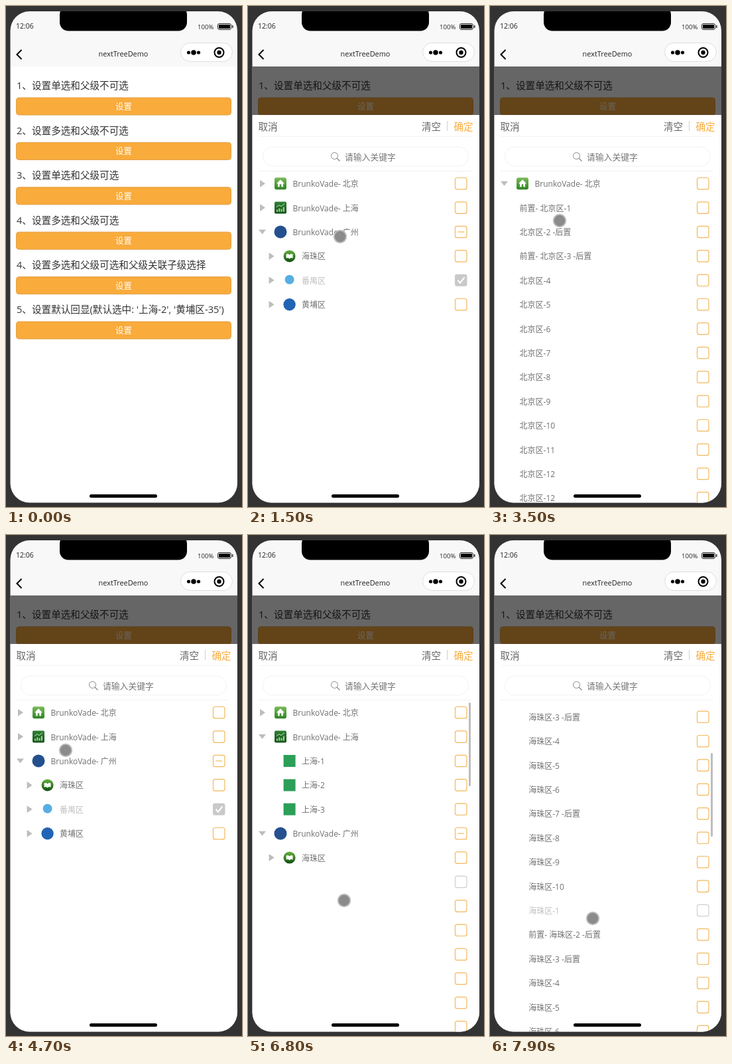
Recreate the animation shown at these times as an HTML page with a canvas. Size 356 by 754 pixels, loop 8000 ms.

```html
<!DOCTYPE html>
<html lang="zh-CN">
<head>
<meta charset="utf-8">
<title>nextTreeDemo</title>
<style>
html, body { margin: 0; width: 356px; height: 754px; overflow: hidden; background: #333; }
canvas { display: block; width: 356px; height: 754px; }
</style>
</head>
<body>
<canvas id="stage"></canvas>
<script>
const canvas = document.getElementById('stage');
const ctx = canvas.getContext('2d');
const dpr = window.devicePixelRatio || 1;
canvas.width = 356 * dpr;
canvas.height = 754 * dpr;
ctx.scale(dpr, dpr);

const LOOP = 8000, STEP = 100;
const ORANGE = '#f9ab3b', ROW = 36.4, PANEL_TOP = 164, SCROLL_END = 321;
const BRAND = 'BrunkoVade- ';
const BEIJING = { open: 2700, ready: 2800, close: 4500 };
const SHANGHAI = { open: 5400, ready: 5500, close: LOOP };
const HAIZHU = { open: 6600, ready: 6900, close: LOOP };
const ICONS_LOADED = 1300;

// Pointer: time, x, y
const POINTER = [
  [100, 344, 137], [200, 275, 290], [300, 195, 396], [400, 190, 360],
  [1300, 190, 360], [1700, 88, 334], [1800, 88, 334], [2100, 19, 279],
  [2300, 21, 272], [2500, 43, 282], [3100, 62, 302], [3500, 105, 323],
  [4000, 106, 338], [4100, 106, 338], [4400, 26, 274], [4700, 90, 324],
  [4900, 90, 324], [5300, 26, 304], [5500, 30, 308], [5800, 60, 400],
  [6200, 37, 486], [6500, 37, 486], [6800, 145, 550], [7900, 155, 577]
];

const clamp = v => Math.max(0, Math.min(1, v));
const smooth = u => u * u * (3 - 2 * u);

function text(str, x, y, size, color, align = 'left') {
  ctx.font = `${size}px "Open Sans", "Noto Sans CJK SC", "Noto Sans CJK", sans-serif`;
  ctx.textAlign = align;
  ctx.fillStyle = color;
  ctx.fillText(str, x, y + size * 0.37);
}

function box(x, y, w, h, r, fill, stroke, width = 1) {
  ctx.beginPath();
  ctx.roundRect(x, y, w, h, r);
  paint(fill, stroke, width);
}

function disc(x, y, r, fill, stroke, width = 1) {
  ctx.beginPath();
  ctx.arc(x, y, r, 0, 7);
  paint(fill, stroke, width);
}

function poly(points, fill, stroke, width = 1) {
  ctx.beginPath();
  points.forEach(([x, y]) => ctx.lineTo(x, y));
  paint(fill, stroke, width);
}

function paint(fill, stroke, width) {
  if (fill) { ctx.fillStyle = fill; ctx.fill(); }
  if (stroke) { ctx.strokeStyle = stroke; ctx.lineWidth = width; ctx.stroke(); }
}

function rect(x, y, w, h, fill) {
  ctx.fillStyle = fill;
  ctx.fillRect(x, y, w, h);
}

function glossy(top, bottom) {
  const g = ctx.createLinearGradient(0, -9, 0, 9);
  g.addColorStop(0, top);
  g.addColorStop(1, bottom);
  return g;
}

const ICONS = {
  house() {
    box(-9, -9, 18, 18, 3, glossy('#7cba58', '#2f8426'));
    poly([[-6, 0], [0, -6], [6, 0], [4, 0], [4, 5], [1.3, 5], [1.3, 1], [-1.3, 1], [-1.3, 5], [-4, 5], [-4, 0]], '#fff');
  },
  chart() {
    box(-9, -9, 18, 18, 2, glossy('#2f8035', '#12541b'));
    [3, 5, 4, 7].forEach((h, i) => rect(-6 + i * 3.3, 6 - h, 2, h, '#a9d48c'));
    poly([[-6, -1], [-2, -4], [1, -2], [6, -6]], null, '#c9e8b3');
  },
  book() {
    disc(0, 0, 9, glossy('#67b13e', '#0d4f10'));
    poly([[-5, -3], [-2, -3.5], [0, -2], [2, -3.5], [5, -3], [5, 3], [2, 2.5], [0, 4], [-2, 2.5], [-5, 3]], '#fff');
  },
  navy() { disc(0, 0, 9.5, '#25508f'); },
  sky() { disc(0, -1, 7, '#56aee2'); },
  blue() { disc(0, 0, 9.2, '#2264b4'); },
  green() { box(-9, -9, 18, 18, 0, '#2b9f58'); }
};

function treeRows(t) {
  const rows = [];
  const isOpen = n => t >= n.open && t < n.close;
  const isReady = n => t >= n.ready && t < n.close;
  const add = (label, depth, more) => rows.push({ label, depth, ...more });

  add(BRAND + '北京', 0, { icon: 'house', arrow: true, down: isReady(BEIJING) });
  if (isOpen(BEIJING)) {
    for (let i = 1; i <= 14; i++) {
      const pre = i === 1 || i === 3 ? '前置- ' : '';
      const post = i === 2 || i === 3 ? ' -后置' : '';
      add(`${pre}北京区-${Math.min(i, 12)}${post}`, 1, { blank: !isReady(BEIJING) });
    }
  }
  add(BRAND + '上海', 0, { icon: 'chart', arrow: true, down: isOpen(SHANGHAI) });
  if (isOpen(SHANGHAI)) {
    for (let i = 1; i <= 3; i++) add('上海-' + i, 1, { icon: 'green', blank: !isReady(SHANGHAI) });
  }
  add(BRAND + '广州', 0, { icon: 'navy', arrow: true, down: true, partial: true });
  add('海珠区', 1, { icon: 'book', arrow: true, down: isReady(HAIZHU) });
  if (isOpen(HAIZHU)) {
    for (let i = 0; i < 40; i++) {
      const n = i % 10 + 1;
      const post = [2, 3, 7].includes(n) ? ' -后置' : '';
      add(`${n === 2 ? '前置- ' : ''}海珠区-${n}${post}`, 2, { disabled: n === 1, blank: !isReady(HAIZHU) });
    }
  }
  const late = t < ICONS_LOADED;
  add('番禺区', 1, { icon: 'sky', arrow: true, disabled: true, checked: true, late });
  add('黄埔区', 1, { icon: 'blue', arrow: true, late });
  return rows;
}

function drawRow(row, y) {
  const left = 13.6 * row.depth;
  if (!row.blank) {
    if (row.arrow) {
      const x = left + 21.5;
      poly(row.down ? [[x - 5.5, y - 3.5], [x + 5.5, y - 3.5], [x, y + 3.5]]
                    : [[x - 3.5, y - 5.5], [x + 4.5, y], [x - 3.5, y + 5.5]], '#bdbdbd');
    }
    if (row.icon && !row.late) {
      ctx.save();
      ctx.translate(left + 49, y);
      ICONS[row.icon]();
      ctx.restore();
    }
    text(row.label, left + (row.icon ? 67.5 : 31), y + 0.5, 12, row.disabled ? '#bfbfbf' : '#707070');
  }
  if (row.checked) {
    box(312, y - 9, 18.5, 18, 3, '#c9c9c9');
    poly([[316.5, y], [320, y + 4], [326.5, y - 4.5]], null, '#fff', 2.2);
  } else {
    box(312.5, y - 8.7, 17.5, 17.4, 3, '#fff', row.disabled ? '#cfcfcf' : '#f5b85c', 1.2);
    if (row.partial) rect(316.5, y - 0.6, 9.5, 1.2, '#f5b85c');
  }
}

function drawPage(t) {
  const titles = [
    '1、设置单选和父级不可选', '2、设置多选和父级不可选', '3、设置单选和父级可选',
    '4、设置多选和父级可选', '4、设置多选和父级可选和父级关联子级选择',
    "5、设置默认回显(默认选中: '上海-2', '黄埔区-35')"
  ];
  rect(6, 91, 344, 657, '#fff');
  titles.forEach((title, i) => {
    const y = 120 + i * 67.4;
    const pressed = i === 3 && t === 300;
    text(title, 16, y, 14.6, '#333');
    box(15.5, y + 18, 324, 26, 4, pressed ? '#e09a35' : ORANGE, '#e2a044');
    text('设置', 177.5, y + 31.5, 12.4, '#fff', 'center');
  });
}

function drawPanel(t, top) {
  rect(6, top, 344, 600, '#fff');
  text('取消', 15.5, top + 17.5, 14.6, '#666');
  text('清空', 262, top + 17.5, 14.6, '#666');
  rect(300, top + 9, 1, 15, '#d0d0d0');
  text('确定', 310.5, top + 17.5, 14.6, ORANGE);
  rect(16, top + 32, 320, 1, '#f4f4f4');
  box(22.5, top + 48, 310, 29, 14.5, '#fff', '#f2f2f2');
  disc(130.5, top + 61.5, 5, null, '#888');
  poly([[134, top + 65], [138.5, top + 69.5]], null, '#888', 1.2);
  text('请输入关键字', 146, top + 63, 12.8, '#757575');
  rect(16, top + 84, 320, 1, '#f1f1f1');

  const scroll = SCROLL_END * smooth(clamp((t - 6900) / 1000));
  ctx.save();
  ctx.beginPath();
  ctx.rect(6, top + 85, 344, 600);
  ctx.clip();
  treeRows(t).forEach((row, i) => {
    const y = top + 103.2 + i * ROW - scroll;
    if (y > top + 60 && y < 770) drawRow(row, y);
  });
  if ((t >= BEIJING.open && t < 3300) || t >= HAIZHU.open) {
    box(333, top + 88 + scroll * 0.237, 3, 126, 1.5, '#bdbdbd');
  }
  ctx.restore();
}

function drawHeader() {
  rect(6, 8, 344, 83, '#f8f8f8');
  box(81, 0, 192, 37.5, 13, '#000');
  text('12:06', 15, 30, 10.5, '#222');
  text('100%', 289, 31.5, 9.6, '#222');
  box(319.5, 26.5, 20, 9, 2.5, null, '#222');
  box(321, 28, 17, 6, 1, '#000');
  rect(341, 29, 1.5, 4, '#222');
  poly([[23.5, 66], [16.5, 73], [23.5, 80]], null, '#000', 2);
  text('nextTreeDemo', 177, 71.5, 10.9, '#222', 'center');
  box(263.5, 55.5, 78, 28, 14, '#fff', '#dedede');
  disc(275.5, 70, 2.6, '#000');
  disc(283, 70, 3.8, '#000');
  disc(290.5, 70, 2.6, '#000');
  disc(321.5, 70, 7, null, '#000', 2);
  disc(321.5, 70, 3.2, '#000');
}

function drawPointer(t) {
  if (t < POINTER[0][0]) return;
  const next = POINTER.findIndex(k => k[0] > t);
  const b = next < 0 ? POINTER[POINTER.length - 1] : POINTER[next];
  const a = next < 0 ? b : POINTER[next - 1];
  const u = a === b ? 0 : (t - a[0]) / (b[0] - a[0]);
  disc(a[1] + (b[1] - a[1]) * u, a[2] + (b[2] - a[2]) * u, 9.2, '#8b8b8b', '#bcbcbc', 2);
}

function draw(now) {
  const t = Math.floor(now % LOOP / STEP) * STEP;
  rect(0, 0, 356, 754, '#333');
  ctx.save();
  ctx.beginPath();
  ctx.roundRect(6.5, 8, 342.5, 739.5, 29);
  ctx.clip();
  drawPage(t);
  const shown = 1 - Math.pow(1 - clamp((t - 1050) / 350), 2.4);
  if (shown > 0) {
    rect(6, 91, 344, 657, `rgba(0,0,0,${0.6 * shown})`);
    drawPanel(t, PANEL_TOP + (1 - shown) * 584);
  }
  drawHeader();
  box(126, 735, 102, 5, 2.5, '#000');
  drawPointer(t);
  ctx.restore();
}

const start = performance.now();
function tick() {
  draw(performance.now() - start);
  requestAnimationFrame(tick);
}
tick();
</script>
</body>
</html>
```
